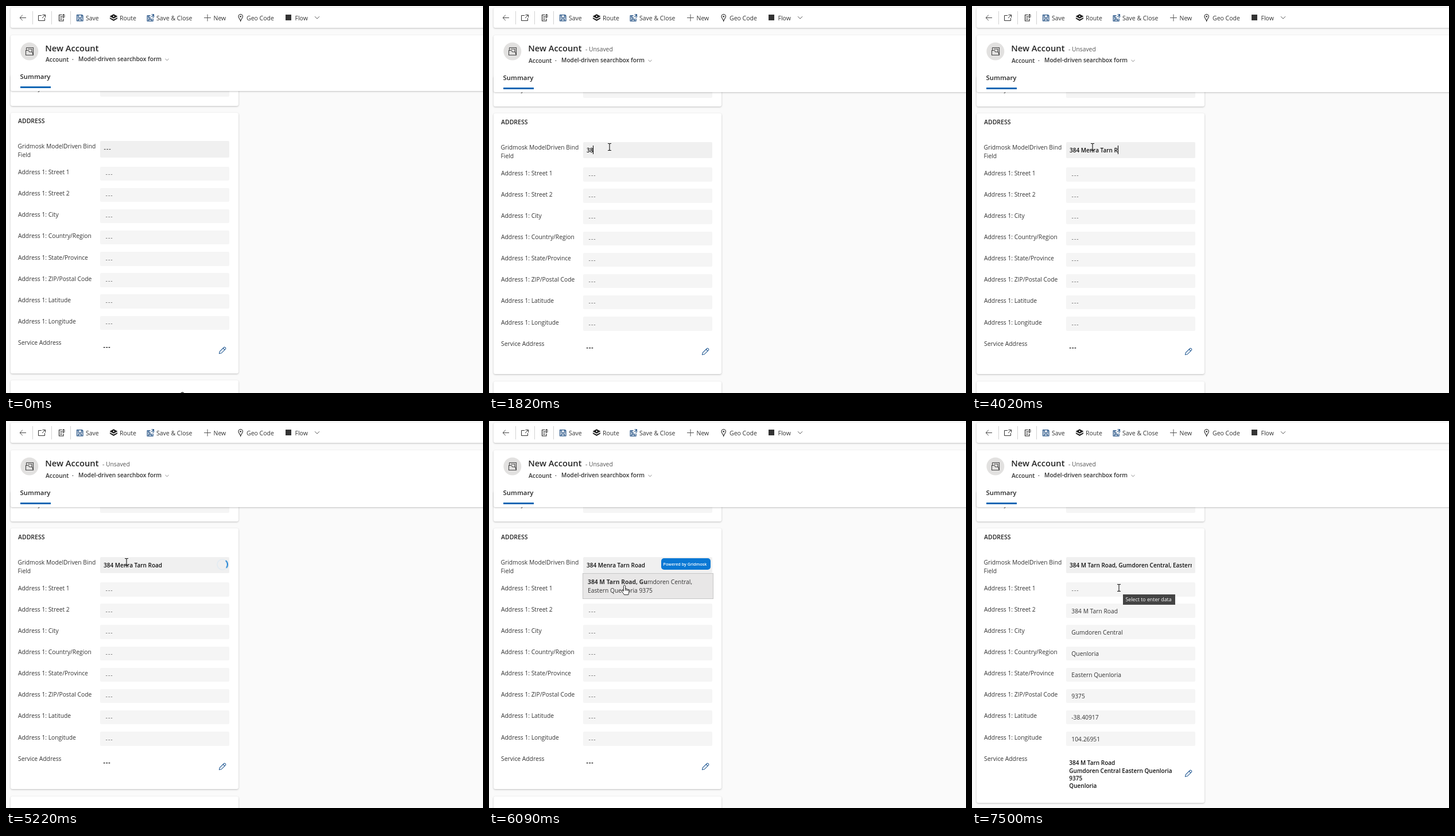
Recreate the animation shown at these times as an HTML page. Size 831x674 px, loop 8000 ms.

```html
<!DOCTYPE html>
<html lang="en">
<head>
<meta charset="utf-8">
<title>New Account form</title>
<style>
html, body { margin: 0; width: 100%; height: 100%; overflow: hidden; background: #fafafa; }
#stage { position: relative; width: 831px; height: 674px; overflow: hidden; background: #fafafa;
  font-family: "Open Sans", "Noto Sans", sans-serif; }
#stage div, #stage svg { position: absolute; }
#stage svg { left: 0; top: 0; overflow: visible; fill: none; }
.text { white-space: pre; line-height: 16px; }
.card { background: #fff; border-radius: 3px; box-shadow: 0 1px 3px rgba(0, 0, 0, .24); }
.field { background: #f5f5f5; border-radius: 2px; }
.dash { letter-spacing: 1.1px; }
#caret { position: absolute; top: 6px; width: 1px; height: 15px; background: #000; }
</style>
</head>
<body>
<div id="stage"></div>
<script>
const LOOP = 8000;
const TYPED = '384 Menra Tarn Road';
const STREET = '384 M Tarn Road';
const TOWN = 'Gumdoren Central';
const REGION = 'Eastern Quenloria';
const COUNTRY = 'Quenloria';
const ZIP = '9375';
const KEYS = [1690, 1820, 2020, 2280, 2550, 2750, 2880, 3020, 3080, 3220,
  3410, 3550, 3620, 3690, 3820, 4020, 4160, 4220, 4290];
const AT = { focus: 770, spin: 4820, list: 5630, hover: 6090, pick: 6770, leave: 6860, tip: 7370, fill: 7500 };
// Pointer path: time, x, y
const PATH = [[150, 594, 483], [220, 500, 405], [350, 330, 262], [460, 246, 198], [560, 218, 238],
  [620, 213, 244], [770, 213, 244], [840, 210, 245.5], [6089, 210, 245.5],
  [6090, 236, 286], [6230, 243, 305], [6430, 256, 290.5], [LOOP, 256, 290.5]];
const ROWS = [
  ['Street 1', ''], ['Street 2', STREET], ['City', TOWN], ['Country/Region', COUNTRY],
  ['State/Province', REGION], ['ZIP/Postal Code', ZIP], ['Latitude', '-38.40917'], ['Longitude', '104.26951']
];

const stage = document.getElementById('stage');

function box(parent, x, y, w, h, cls = '', css = '') {
  const el = document.createElement('div');
  el.className = cls;
  el.style.cssText = `left:${x}px;top:${y}px;width:${w}px;height:${h}px;${css}`;
  return parent.appendChild(el);
}

// Places text by its baseline.
function text(parent, x, base, str, size = 10.3, weight = 400, color = '#333') {
  const el = document.createElement('div');
  el.className = 'text';
  el.style.cssText = `left:${x}px;top:${base - 8 - size * .388}px;font-size:${size}px;font-weight:${weight};color:${color}`;
  el.textContent = str;
  return parent.appendChild(el);
}

function art(parent, markup) {
  const el = document.createElementNS('http://www.w3.org/2000/svg', 'svg');
  el.setAttribute('width', 831);
  el.setAttribute('height', 674);
  el.innerHTML = markup;
  return parent.appendChild(el);
}

const line = (d, color = '#333', width = 1, fill = 'none') =>
  `<path d="${d}" stroke="${color}" stroke-width="${width}" fill="${fill}"/>`;

const show = (el, on) => { el.style.visibility = on ? 'visible' : 'hidden'; };

function dashes(parent, x, base, weight, color) {
  const el = text(parent, x, base, '---', 10.3, weight, color);
  el.classList.add('dash');
  return el;
}

// Scrolling form
const form = box(stage, 0, 0, 831, 674);
box(form, 8, 120, 396.5, 53.5, 'card');
text(form, 21, 147, 'Industry');
box(form, 163.5, 134, 225.5, 24, 'field');

const card = box(form, 8, 185.5, 396.5, 454, 'card');
text(form, 21, 204, 'ADDRESS', 10.5, 600, '#242424');
text(form, 20.5, 248, 'Gridmosk ModelDriven Bind');
text(form, 20.5, 263, 'Field');
box(form, 163.5, 235, 225.5, 28.5, 'field', 'background:#f0f0f0');
const bindDash = dashes(form, 170.5, 252.5, 600, '#444');
const input = box(form, 170, 235, 213, 28.5, '', 'overflow:hidden');
const inputText = text(input, 0, 18.5, '', 10, 600, '#111');
const caretLine = box(input, 0, 0, 0, 28.5, 'text', 'font-size:10px;font-weight:600');
const caretPad = document.createElement('span');
const caret = document.createElement('span');
caret.id = 'caret';
caretPad.style.visibility = 'hidden';
caretLine.append(caretPad, caret);

const values = ROWS.map(([name, value], i) => {
  const y = i * 37.15;
  text(form, 21, 293 + y, 'Address 1: ' + name);
  box(form, 163.5, 279.5 + y, 225.5, 24.5, 'field');
  return {
    dash: dashes(form, 173.5, 296 + y, 400, '#666'),
    full: text(form, 173.3, 296 + y, value),
    value
  };
});

text(form, 21, 590, 'Service Address');
const serviceDash = dashes(form, 169.5, 596.8, 700, '#111');
const service = [STREET, `${TOWN} ${REGION}`, ZIP, COUNTRY]
  .map((str, i) => text(form, 169.3, 597.6 + i * 13.2, str, 10, 600, '#111'));
const pen = art(form, line('M371.5 605.4l.8-3.6 7.3-7.3q1-.9 2 0l.9.9q.9 1 0 2l-7.3 7.2zM378.2 596l2.9 2.9', '#2a5f97', 1.1));

const next = box(form, 0, 652, 831, 60);
box(next, 8, 0, 396.5, 60, 'card');
art(next, line('M304.5 22.5q2.8-3.4 5.6 0', '#222', 1.2));

// Header
const head = box(stage, 0, 0, 831, 160);
box(head, 8, 2.5, 840, 35.5, 'card');
const headCard = box(head, 8, 50.5, 840, 97.5, 'card');
[['Save', 139], ['Route', 198], ['Save & Close', 262], ['New', 361.5], ['Geo Code', 419], ['Flow', 503.5]]
  .forEach(([str, x]) => text(head, x, 24.6, str, 10.5));
[45.5, 79, 112].forEach(x => box(head, x, 9, 1, 23, '', 'background:#d2d2d2'));

const navy = '#1f4e82';
art(head,
  line('M35 20.5H24M28.8 15.8L24 20.5l4.8 4.7', '#444') +
  line('M62 16.5H56.5V25.5H67.5V21M63.5 15.5H68.5V20M68.5 15.5L63 21') +
  line('M97.5 15.5H92.5V26H100V22M94.5 18.5h3.5M94.5 21h3M94.5 23.5h3M99.5 14.5V20l3-1.8M99.5 14.5l3 2', '#222', 1.1) +
  line('M123.6 15.6h9l1.3 1.3v8.9h-10.3zM126 15.6v4.2h5.8v-4.2M126.3 25.8v-3.3h5v3.3', navy, 1.3) +
  line('M187.5 14.6l6.4 3.4-6.4 3.4-6.4-3.4z', '#111', .6, '#111') +
  line('M181.2 20.4l6.3 3.3 6.3-3.3v1.7l-6.3 3.6-6.3-3.6z', '#111', .4, '#111') +
  '<circle cx="187.5" cy="18" r="1.2" fill="#fff"/>' +
  line('M251.5 17H246.2V26.2H256V21.5M248.5 17v3.5h3.5M248.6 26v-3h4.8v3', navy, 1.3) +
  line('M253.5 14.8h4v4.2M257.3 15l-3.8 4M255.3 19.5h2.5', navy, 1.1) +
  line('M345 20.5h12M351 14.5v12', '#555') +
  line('M408.7 26c-.8-3-3.7-4.9-3.7-7.8a3.7 3.7 0 0 1 7.4 0c0 2.9-2.9 4.8-3.7 7.8z', '#222', 1.1) +
  '<circle cx="408.7" cy="18.2" r="1.2" fill="#222"/>' +
  '<rect x="487" y="15" width="10" height="10" fill="#333"/>' +
  line('M538 18.2l4 4 4-4', '#555') +
  '<circle cx="40.8" cy="79" r="15.5" fill="#e2e1e0"/>' +
  line('M35.5 72.5H47.5V85.5H34.5V77.5H39L41 80H45.5L47.5 85.5M35.5 77V72.5M38 75H45V79.5', '#444', 1.1)
);
text(head, 68.3, 79, 'New Account', 14.7, 600, '#242424');
const unsaved = text(head, 168, 79, '- Unsaved', 10.3, 400, '#555');

const crumbs = box(head, 0, 0, 831, 160);
text(crumbs, 69, 96.6, 'Account', 10.3, 600);
text(crumbs, 115, 96.6, '·', 10.3, 600);
text(crumbs, 126, 96.4, 'Model-driven searchbox form', 10.2, 600);
art(crumbs, line('M277.5 92l3 2.8 3-2.8', '#777', .9));
text(crumbs, 24.5, 127.2, 'Summary', 11.4, 600, '#242424');
box(crumbs, 25, 140.4, 53, 2.2, '', 'background:#1267b4');

// Popups
const spinner = art(stage,
  '<circle cx="377" cy="250" r="9" stroke="#e2ebf2" stroke-width="1.5"/>' +
  '<path id="arc" d="M370.6 243.6A9 9 0 0 1 383.4 243.6" stroke="#127cd2" stroke-width="2"/>');
const arc = spinner.querySelector('#arc');
arc.style.transformOrigin = '377px 250px';
const spin = arc.animate([{ transform: 'rotate(0deg)' }, { transform: 'rotate(360deg)' }],
  { duration: 1300, iterations: Infinity, easing: 'cubic-bezier(.53,.21,.29,.67)' });
spin.pause();

const list = box(stage, 0, 0, 831, 674);
const badge = box(list, 300, 239, 86, 20, '', 'background:#0a78d4;border-radius:5px');
text(badge, 3.6, 12.8, 'Powered by Gridmosk', 7.2, 600, '#fff');
const option = box(list, 163, 265, 226, 43, '', 'border:1px solid #c6c6c6');
const found = `${STREET}, ${TOWN},`;
const first = text(option, 8, 18, '', 10.3);
const strong = document.createElement('b');
strong.textContent = found.slice(0, TYPED.length);
first.append(strong, found.slice(TYPED.length));
text(option, 8, 33, `${REGION} ${ZIP}`);

const tip = box(stage, 262.5, 302, 91.5, 17.5, '', 'background:#444');
text(tip, 5, 12, 'Select to enter data', 8.85, 400, '#fff');

// Pointers, each drawn around its hot spot
const pointer = art(stage,
  '<g>' + line('M0 0V15.5L3.6 12.2 6 17.8 8.3 16.8 5.9 11.3H10.8Z', '#000', 1, '#fff') + '</g>' +
  '<g>' + line('M-3-6H-1Q0-6 0-5V5Q0 6-1 6H-3M3-6H1Q0-6 0-5M0 5Q0 6 1 6H3', '#111', 1.1) + '</g>' +
  '<g>' + line('M0 0C1 0 1.6.6 1.6 1.5V6.5c.5-.6 2-.5 2.3.4.6-.5 1.9-.3 2.1.6.7-.4 1.9 0 1.9 1.2v3c0 2-1.2 3-1.2 4.8H-.6C-1 14.5-4.6 11.5-4.8 10c0-1 1.4-1.5 2.3-.6l.9 1V1.5C-1.6.6-1 0 0 0ZM1.6 6.5V9.5M3.9 7V9.8M6 7.6V10', '#111', .9, '#fff') + '</g>');
const [arrow, beam, hand] = pointer.children;

function pointerAt(t) {
  const i = Math.max(1, PATH.findIndex(p => p[0] > t));
  const [t0, x0, y0] = PATH[i - 1], [t1, x1, y1] = PATH[i];
  const k = Math.min(1, Math.max(0, (t - t0) / (t1 - t0)));
  return [x0 + (x1 - x0) * k, y0 + (y1 - y0) * k];
}

function draw(t) {
  const between = (a, b) => t >= a && t < b;
  const count = KEYS.filter(k => k <= t).length;
  const dirty = count > 0, picked = t >= AT.pick, filled = t >= AT.fill;

  form.style.top = (dirty ? 1.6 : 0) + 'px';
  crumbs.style.top = (dirty ? 2 : 0) + 'px';
  headCard.style.height = (dirty ? 99 : 97.5) + 'px';
  show(unsaved, dirty);

  const value = picked ? `${found} ${REGION} ${ZIP}` : TYPED.slice(0, count);
  inputText.textContent = value;
  caretPad.textContent = value;
  show(bindDash, t < AT.focus);
  const lastKey = count ? KEYS[count - 1] : AT.focus;
  show(caret, between(AT.focus, AT.pick) && (t - lastKey) % 1060 < 530);

  show(spinner, between(AT.spin, AT.list));
  spin.currentTime = Math.max(0, t - AT.spin);
  show(list, between(AT.list, AT.pick));
  option.style.background = t >= AT.hover ? '#e8e7e7' : '#fff';
  show(tip, t >= AT.tip);

  values.forEach(v => {
    const on = filled && v.value !== '';
    show(v.full, on);
    show(v.dash, !on);
  });
  show(serviceDash, !filled);
  service.forEach(el => show(el, filled));
  card.style.height = (filled ? 477.5 : 454) + 'px';
  pen.style.top = (filled ? 12 : 0) + 'px';
  next.style.top = (filled ? 675.5 : 652) + 'px';

  const [x, y] = pointerAt(t);
  pointer.style.transform = `translate(${x}px,${y}px)`;
  show(arrow, between(150, 560));
  show(beam, between(560, AT.hover) || t >= AT.leave);
  show(hand, between(AT.hover, AT.leave));
}

const start = performance.now();
function tick() {
  draw((performance.now() - start) % LOOP);
  requestAnimationFrame(tick);
}
tick();
</script>
</body>
</html>
```
